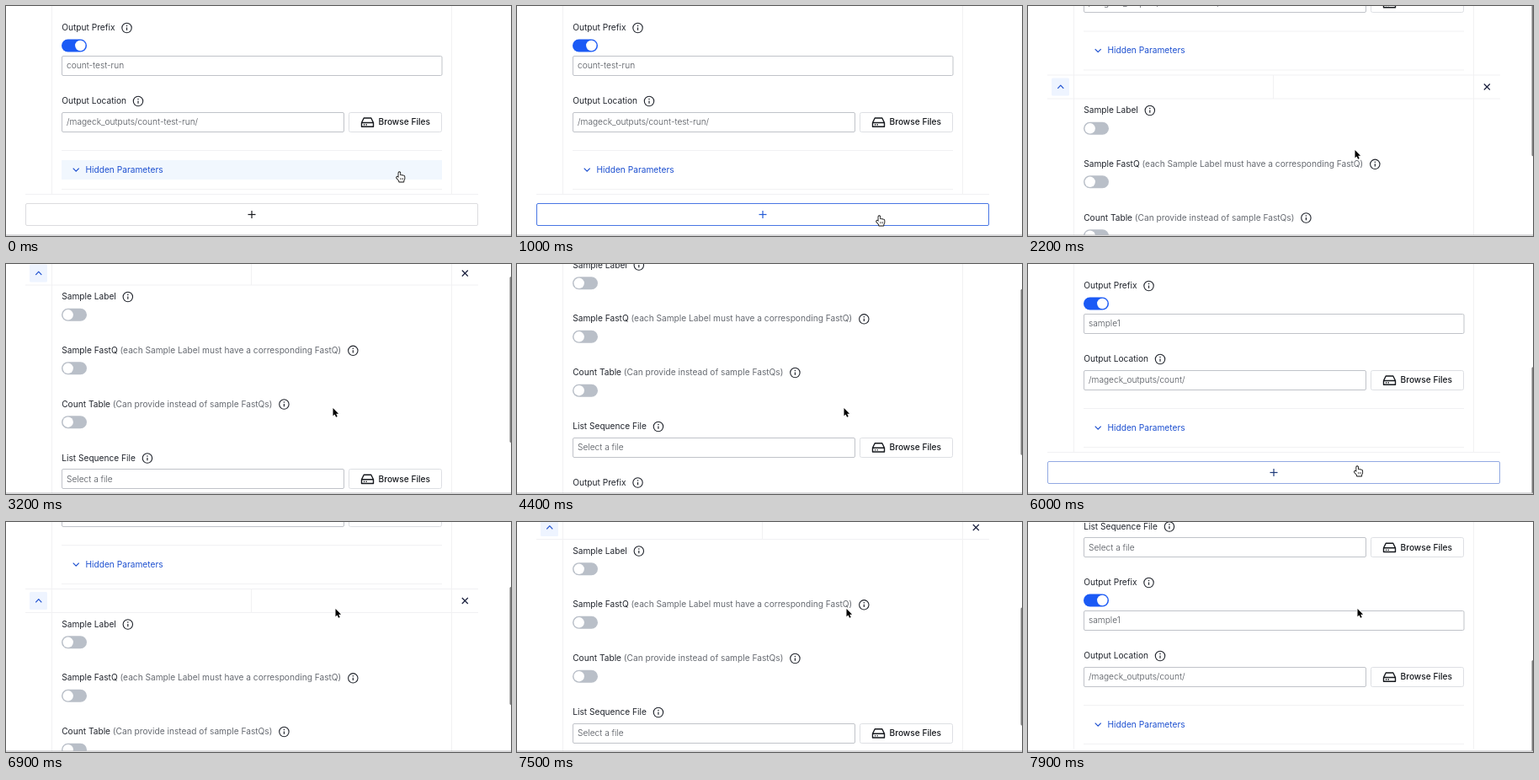
These frames come from a looping animation (600x273 px, 8 s). An HTML page with a canvas:

```html
<!DOCTYPE html>
<html lang="en">
<head>
<meta charset="utf-8">
<title>Workflow form</title>
<style>
  html, body { margin: 0; width: 100%; height: 100%; overflow: hidden; background: #fff; }
  canvas { display: block; width: 600px; height: 273px; }
</style>
</head>
<body>
<canvas id="stage"></canvas>
<script>
const W = 600, H = 273, LOOP = 8000, STEP = 100;
const FORM_H = 497.5;           // distance between two form headers
const ROW = 14;                 // half height of a header row
const INK = '#20242c', GREY = '#666a71', BLUE = '#1c4fd0', EDGE = '#c0c3c9', FAINT = '#f1f1f3';
const FONT = 'Inter, "Open Sans", sans-serif';
const SIZE = 10.17;

const canvas = document.getElementById('stage');
const ctx = canvas.getContext('2d');
const dpr = window.devicePixelRatio || 1;
canvas.width = W * dpr;
canvas.height = H * dpr;

// Keyframes: [time, value...]; each span eases in and out.
const SCROLL = [
  [0, -260], [1100, -260], [2200, -401.5], [2500, -401.5], [3200, -486.5],
  [4200, -486.5], [5000, -726.5], [5200, -726.5], [5500, -757.5],
  [6600, -757.5], [6900, -901.5], [7100, -911], [7300, -911], [7900, -1209]
];
const POINTER = [
  [0, 467.4, 197], [1000, 430.4, 249], [1200, 430.4, 249], [2000, 388.5, 171],
  [5600, 388.5, 171], [6100, 391.5, 248], [6300, 391.5, 248], [6500, 391.5, 103]
];

const clamp = (v, a, b) => Math.min(b, Math.max(a, v));
const smooth = u => u * u * (3 - 2 * u);

function track(keys, t) {
  const i = keys.findIndex(k => k[0] > t);
  if (i < 0) return keys[keys.length - 1].slice(1);
  const a = keys[i - 1], b = keys[i];
  const u = smooth((t - a[0]) / (b[0] - a[0]));
  return a.slice(1).map((v, n) => v + (b[n + 1] - v) * u);
}

const formCount = t => t < 1200 ? 1 : t < 6300 ? 2 : 3;
const headerY = (i, t) => track(SCROLL, t)[0] + i * FORM_H;

// What lies under the pointer: { kind, form }
function hit(t) {
  const [x, y] = track(POINTER, t);
  const n = formCount(t);
  const within = (mid, half) => Math.abs(y - mid) < half;
  if (within(headerY(n, t) + 10, 13)) return { kind: 'add' };
  for (let i = 0; i < n; i++) {
    const c = headerY(i, t);
    if (within(c + 454, 11.5)) return { kind: 'hidden', form: i };
    if (x < 401 && [244, 331, 398].some(d => within(c + d, 11.5))) return { kind: 'field' };
  }
  return { kind: 'none' };
}

function hover(t, kind, form) {
  const on = s => {
    const h = hit(Math.max(0, s));
    return h.kind === kind && h.form === form ? 0.5 : 0;
  };
  return on(t) + on(t - STEP);
}

function mix(a, b, u) {
  return 'rgb(' + a.map((v, i) => Math.round(v + (b[i] - v) * u)).join(',') + ')';
}

function line(points, color, width = 1) {
  ctx.beginPath();
  points.forEach(([x, y], i) => i ? ctx.lineTo(x, y) : ctx.moveTo(x, y));
  ctx.strokeStyle = color;
  ctx.lineWidth = width;
  ctx.stroke();
}

function box(x, y, w, h, r, fill, stroke, width = 1) {
  ctx.beginPath();
  ctx.roundRect(x, y, w, h, r);
  if (fill) { ctx.fillStyle = fill; ctx.fill(); }
  if (stroke) { ctx.strokeStyle = stroke; ctx.lineWidth = width; ctx.stroke(); }
}

function disc(x, y, r, fill) {
  ctx.beginPath();
  ctx.arc(x, y, r, 0, 7);
  ctx.fillStyle = fill;
  ctx.fill();
}

// Draws text centred on y by cap height; returns its right end.
function text(str, x, y, color, weight = 400) {
  ctx.font = `${weight} ${SIZE}px ${FONT}`;
  ctx.fillStyle = color;
  ctx.fillText(str, x, y + 3.6);
  return x + ctx.measureText(str).width;
}

function label(str, y, note) {
  let x = text(str + (note ? ' ' : ''), 66.2, y, INK);
  if (note) x = text(note, x, y, GREY);
  x += 14;
  ctx.beginPath();
  ctx.arc(x, y + 0.5, 5.7, 0, 7);
  ctx.strokeStyle = INK;
  ctx.lineWidth = 1.1;
  ctx.stroke();
  line([[x, y], [x, y + 3.3]], INK, 1.2);
  disc(x, y - 2, 0.8, INK);
}

function toggle(y, on) {
  box(66, y - 7.5, 30, 15, 7.5, on ? '#1b5af5' : '#b9bfc8');
  disc(on ? 88.3 : 73.7, y, 6.2, '#fff');
}

function field(str, y, right) {
  box(66.5, Math.round(y) - 11.5, right - 67, 23, 1.5, '#fff', EDGE);
  text(str, 72, y, '#50545b', 300);
}

function browse(y) {
  box(407.5, Math.round(y) - 11.5, 110, 23, 2, '#fff', '#dddfe3');
  ctx.lineJoin = 'round';
  line([[422.5, y + 0.8], [425.2, y - 4.7], [433.8, y - 4.7], [436.5, y + 0.8],
        [436.5, y + 5.5], [422.5, y + 5.5], [422.5, y + 0.8], [436.5, y + 0.8]], '#15181d', 1.4);
  disc(425.6, y + 3.2, 0.8, '#15181d');
  disc(428.2, y + 3.2, 0.8, '#15181d');
  text('Browse Files', 442.5, y, '#15181d', 500);
}

function chevron(x, y, dir) {
  line([[x - 3.5, y - 1.8 * dir], [x, y + 1.8 * dir], [x + 3.5, y - 1.8 * dir]], BLUE, 1.2);
}

function header(c) {
  for (const y of [c - ROW, c + ROW]) line([[23, y], [561, y]], FAINT);
  line([[291.5, c - ROW], [291.5, c + ROW]], FAINT);
  box(28, c - 10.5, 21, 21, 1.5, '#eef4ff');
  chevron(38.8, c, -1);
  const k = 3.5, x = 545.3;
  line([[x - k, c - k], [x + k, c + k]], '#1d2340', 1.2);
  line([[x - k, c + k], [x + k, c - k]], '#1d2340', 1.2);
}

function form(i, t) {
  const c = Math.round(headerY(i, t) * 2) / 2;
  if (c > H + ROW || c + FORM_H < 0) return;
  const [prefix, path] = i ? ['sample1', 'count'] : ['count-test-run', 'count-test-run'];
  for (const x of [54.5, 529.5]) line([[x, c - ROW], [x, c + FORM_H - ROW]], FAINT);
  header(c);
  label('Sample Label', c + 27.5);
  toggle(c + 49.3, false);
  label('Sample FastQ', c + 91.3, '(each Sample Label must have a corresponding FastQ)');
  toggle(c + 112.8, false);
  label('Count Table', c + 155, '(Can provide instead of sample FastQs)');
  toggle(c + 176.7, false);
  label('List Sequence File', c + 219);
  field('Select a file', c + 244, 402);
  browse(c + 244);
  label('Output Prefix', c + 285.5);
  toggle(c + 307, true);
  field(prefix, c + 330.8, 518.5);
  label('Output Location', c + 372.5);
  field(`/mageck_outputs/${path}/`, c + 397.7, 402);
  browse(c + 397.7);

  const lit = hover(t, 'hidden', i);
  if (lit) box(66, c + 443, 452, 23, 0, mix([255, 255, 255], [241, 247, 254], lit));
  for (const d of [431.5, 477.5]) line([[66, c + d], [518, c + d]], FAINT);
  chevron(83.2, c + 454.4, 1);
  text('Hidden Parameters', 94.5, c + 454, BLUE);
}

function addButton(t) {
  const c = Math.round(headerY(formCount(t), t));
  const y = c + 9.5;
  if (y > H + 15) return;
  const lit = hover(t, 'add');
  line([[23, c - ROW - 0.5], [561, c - ROW - 0.5]], FAINT);
  box(23.5, y - 13, 537, 26, 1.5, '#fff', mix([220, 220, 223], [72, 118, 228], lit));
  const ink = mix([24, 26, 30], [38, 92, 214], lit);
  line([[287.5, y], [296.5, y]], ink, 1.2);
  line([[292, y - 4.5], [292, y + 4.5]], ink, 1.2);
}

function scrollbar(t) {
  let alpha = 0;
  if (t >= 1200) alpha = clamp((3900 - t) / 200, 0, 1);
  if (t >= 4300) alpha = clamp((6200 - t) / 200, 0, 1);
  if (t >= 6700) alpha = 1;
  if (!alpha) return;
  const s = headerY(0, t);
  const [top, size] = formCount(t) < 3
    ? [15 + 0.396 * (-486.5 - s), 197]
    : [77 + 0.283 * (-901.5 - s), 140];
  ctx.globalAlpha = alpha;
  box(598.5, top, 4, size, 1.5, '#7d7d7d');
  ctx.globalAlpha = 1;
}

function outlined(path, fill, stroke, width) {
  ctx.lineJoin = 'round';
  ctx.strokeStyle = stroke;
  ctx.lineWidth = width;
  ctx.stroke(path);
  ctx.fillStyle = fill;
  ctx.fill(path);
}

const ARROW = new Path2D('M0 0V9.3L2.1 7.4L3.6 10.8L5.2 10.1L3.7 6.8H6.6Z');
const HAND = new Path2D('M-.9 .9Q0 -.6 .9 .9V4.2Q1.9 3.4 2.7 4.4Q3.7 3.7 4.4 4.7' +
  'Q5.9 4.3 6 5.8V8.2L5 10.2V11.6H-.2V10.4L-3.2 7Q-3.4 5.6 -2.1 5.8L-.9 6.9Z');

function pointer(t) {
  const [x, y] = track(POINTER, t);
  const kind = hit(t).kind;
  ctx.save();
  ctx.translate(x, y);
  if (kind === 'field') {
    for (const [color, width] of [['#fff', 2.6], ['#222', 1.1]]) {
      line([[-2.2, -5], [-0.7, -4.7], [0, -3.8], [0, 4.2], [-0.7, 5.1], [-2.2, 5.4]], color, width);
      line([[2.2, -5], [0.7, -4.7], [0, -3.8], [0, 4.2], [0.7, 5.1], [2.2, 5.4]], color, width);
    }
  } else if (kind === 'none') {
    outlined(ARROW, '#000', '#fff', 1.8);
  } else {
    outlined(HAND, '#fff', '#111', 1.8);
    for (const d of [1.2, 2.7, 4.2]) line([[d, 7], [d, 9.4]], '#333', 0.6);
  }
  ctx.restore();
}

function draw(t) {
  ctx.setTransform(dpr, 0, 0, dpr, 0, 0);
  ctx.fillStyle = '#fff';
  ctx.fillRect(0, 0, W, H);
  ctx.save();
  ctx.beginPath();
  ctx.rect(0, 0, W, 272);
  ctx.clip();
  for (let i = 0; i < formCount(t); i++) form(i, t);
  addButton(t);
  scrollbar(t);
  pointer(t);
  ctx.restore();
  line([[0, 272], [W, 272]], '#b4b4b6');
}

const start = performance.now();
function tick() {
  const t = (performance.now() - start) % LOOP;
  draw(Math.floor(t / STEP) * STEP);
  requestAnimationFrame(tick);
}
tick();
</script>
</body>
</html>
```
